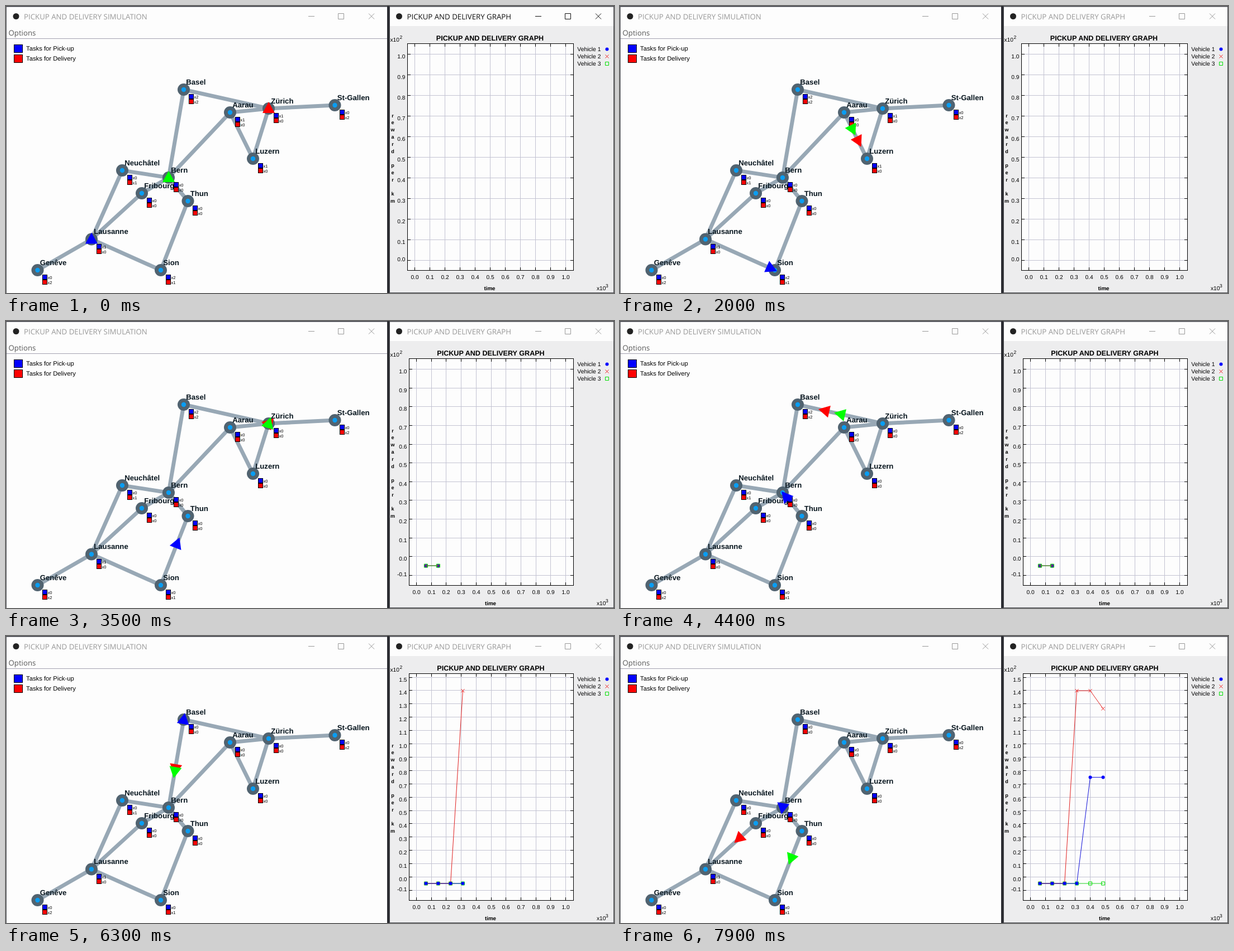
These frames come from a looping animation (1088 px wide and 515 px high, 8 s). An HTML page:

```html
<!DOCTYPE html>
<html lang="en">
<head>
<meta charset="utf-8">
<title>Pickup and delivery simulation</title>
<style>
  html, body { margin: 0; width: 100%; height: 100%; overflow: hidden; background: #fdfdfd; }
  svg { display: block; width: 1088px; height: 515px; text-rendering: geometricPrecision; }
  text { font-family: "Liberation Sans", Arial, sans-serif; white-space: pre; }
  .ui { font-family: "Open Sans", "Noto Sans", sans-serif; font-size: 13.25px; }
  .bold { font-weight: bold; }
  .mid { text-anchor: middle; }
  .end { text-anchor: end; }
  .tick { font-size: 10.2px; }
</style>
</head>
<body>
<svg id="stage" viewBox="0 0 1088 515" xmlns="http://www.w3.org/2000/svg">
  <g id="windows"></g>
  <g id="graph"></g>
  <g id="map"></g>
  <g id="tasks"></g>
  <g id="vehicles"></g>
</svg>
<script>
const LOOP = 8000, STEP = 100;
const BLUE = '#0000ff', RED = '#ff0000', GREEN = '#00ff00';
const COLORS = [BLUE, RED, GREEN];

// name: [x, y, pick-ups, deliveries]
const cities = {
  Basel: [318, 150, 2, 2], Aarau: [401, 191, 1, 0], 'Zürich': [470, 184, 1, 0],
  'St-Gallen': [588.5, 178, 0, 2], Luzern: [442, 274, 1, 0], 'Neuchâtel': [208, 295, 0, 1],
  Bern: [291, 308, 0, 0], Fribourg: [243, 336, 0, 0], Thun: [325.5, 350, 0, 0],
  Lausanne: [153, 418.5, 1, 0], Sion: [277, 474, 2, 1], 'Genêve': [56.5, 474, 0, 2]
};
const roads = ['Genêve Lausanne Neuchâtel Bern Basel Zürich St-Gallen',
  'Lausanne Fribourg Bern Aarau Zürich Luzern Aarau', 'Lausanne Sion Thun Bern'];

// [time, city, 0 pick-up | 1 delivery, new count]
const events = [
  [1600, 'Aarau', 0, 0], [2300, 'Sion', 0, 1], [2400, 'Luzern', 0, 0], [2600, 'Sion', 0, 0],
  [3400, 'Zürich', 0, 0], [4900, 'Basel', 0, 1], [5000, 'Basel', 1, 1],
  [5200, 'Basel', 0, 0], [5400, 'Basel', 1, 0]
];

// keys: [time, position along route], one unit per leg
const vehicles = [
  { route: 'Lausanne Sion Thun Bern Basel Bern',
    keys: [[0, 0], [1599, 0], [1600, .63], [2000, .943], [2070, 1], [2770, 1], [3500, 1.6], [4010, 2],
      [4400, 2.83], [4500, 3], [5100, 3.39], [5990, 4], [6430, 4], [7900, 5]] },
  { route: 'Zürich Aarau Luzern Zürich Basel Bern Fribourg Lausanne',
    keys: [[0, 0], [1599, 0], [1600, 1.15], [2000, 1.615], [2330, 2], [2470, 2], [3340, 3],
      [3490, 3], [4400, 3.68], [4870, 4], [5480, 4], [6300, 4.557], [6960, 5], [7475, 6], [7900, 6.33]] },
  { route: 'Bern Aarau Luzern Zürich Basel Bern Thun Sion',
    keys: [[0, 0], [1599, 0], [1600, .96], [2000, 1.365], [2560, 2], [3450, 3], [3690, 3],
      [4400, 3.495], [5100, 4], [5440, 4], [6300, 4.589], [6910, 5], [7415, 6], [7900, 6.395]] }
];

const pointTimes = [.062, .144, .227, .309, .399, .485];
const rewards = [
  [-.05, -.05, -.05, -.05, .747, .747],
  [-.05, -.05, -.05, 1.397, 1.397, 1.262],
  [-.05, -.05, -.05, -.05, -.05, -.05]
];

const put = (id, html) => { document.getElementById(id).innerHTML = html; };
const text = (x, y, s, cls = '', size = '', fill = '#000') =>
  `<text x="${x}" y="${y}" class="${cls}" fill="${fill}"${size && ` font-size="${size}"`}>${s}</text>`;
const rect = (x, y, w, h, fill, stroke = 'none') =>
  `<rect x="${x}" y="${y}" width="${w}" height="${h}" fill="${fill}" stroke="${stroke}"/>`;
const path = (d, stroke, width = 1, fill = 'none') =>
  `<path d="${d}" stroke="${stroke}" stroke-width="${width}" fill="${fill}"/>`;
const dot = (x, y, r, fill) => `<circle cx="${x}" cy="${y}" r="${r}" fill="${fill}"/>`;

function titleBar(x, right, title, color) {
  const c = right - 28;
  return dot(x + 17, 18.5, 5.5, '#222') + text(x + 31, 23.5, title, 'ui', '', color) +
    path(`M${c - 113} 18.5h11M${c - 59.5} 13.5h10v10h-10zM${c - 5} 13.5l10 10m0 -10l-10 10`, color);
}

function drawWindows(focused) {
  put('windows',
    rect(0, 0, 1088, 515, '#fdfdfd') + rect(686, 36, 402, 479, '#ededee') +
    rect(0, 0, 1088, 1.5, '#33343c') + rect(0, 0, 1, 515, '#55565c') + rect(682, 0, 4, 515, '#2b2c31') +
    rect(686.5, .5, 401, 514, 'none', '#4a4b50') +
    titleBar(1, 682, 'PICKUP AND DELIVERY SIMULATION', '#999') +
    titleBar(686.5, 1088, 'PICKUP AND DELIVERY GRAPH', focused ? '#111' : '#999') +
    text(4.5, 52.5, 'Options', 'ui', '', '#5a5a5a') + rect(1, 58, 681, 1, '#a3a1b0') +
    rect(14.5, 69.5, 15, 14, BLUE, '#000') + text(36, 80, 'Tasks for Pick-up', '', 11.25) +
    rect(14.5, 87.5, 15, 14, RED, '#000') + text(36, 98.3, 'Tasks for Delivery', '', 11.25));
}

function marker(kind, x, y) {
  if (kind === 0) return dot(x, y, 3, BLUE);
  if (kind === 1) return path(`M${x - 3} ${y - 3}l6 6m0 -6l-6 6`, '#f01818');
  return path(`M${x - 3} ${y - 3}h6v6h-6z`, '#00e000');
}

function drawGraph(n) {
  const left = n ? 721 : 718, right = 1015, top = 67, bottom = 474;
  const min = n ? -.1 : 0, max = n > 3 ? 1.448 : 1;
  const spanX = (right - left) / 1.1, spanY = (bottom - top) / 1.1;
  const px = v => left + spanX * (.05 + v);
  const py = v => bottom - spanY * (.05 + (v - min) / (max - min));
  const mid = (left + right) / 2;
  const frame = fill => rect(left + .5, top + .5, right - left, bottom - top, fill, '#000');
  let grid = '', ticks = '', labels = '', out = '';

  for (let i = 0; i <= 10; i++) {
    const x = Math.floor(px(i / 10)) + .5;
    grid += `M${x} ${top}V${bottom}`;
    ticks += `M${x} ${top}v6M${x} ${bottom + 1}v-6`;
    labels += text(x, 489.7, (i / 10).toFixed(1), 'tick mid');
  }
  const first = Math.round(min * 10);
  for (let i = first; py(i / 10) > top; i++) {
    const y = Math.ceil(py(i / 10)) + .5;
    grid += `M${left} ${y}H${right}`;
    ticks += `M${left} ${y}h6M${right + 1} ${y}h-6`;
    labels += text(left - 3.5, y + (i > first ? 7 : 1), (i / 10).toFixed(1), 'tick end');
  }
  out = frame('#fdfdfd') + path(grid, '#c3c3d2') + path(ticks, '#000') + frame('none') + labels;

  const order = n > 3 ? [2, 1, 0] : [0, 1, 2];
  for (const k of order) {
    const pts = rewards[k].slice(0, n).map((v, i) => [px(pointTimes[i]) + .5, py(v) + .5]);
    if (n) out += path('M' + pts.join('L'), ['#1010d8', '#e02020', '#20d020'][k]);
    out += pts.map(p => marker(k, ...p)).join('');
  }

  out += text(mid - .5, 62, 'PICKUP AND DELIVERY GRAPH', 'bold mid', 12.6) +
    text(mid - 1, 509.5, 'time', 'bold mid', 9.8) +
    text(687.5, 64, 'x10', 'tick') + text(704.5, 58.5, '2', '', 8.5) +
    text(1057, 510, 'x10', 'tick') + text(1073, 504.5, '3', '', 8.5);
  [...'reward per km'].forEach((c, i) => { out += text(692, 199.5 + i * 12.8, c, 'bold mid', 9); });
  for (let k = 0; k < 3; k++) {
    out += text(1064.5, 80.5 + k * 13, 'Vehicle ' + (k + 1), 'end', 10.4) + marker(k, 1075.5, 77.5 + k * 13);
  }
  put('graph', out);
}

function drawMap() {
  const list = Object.entries(cities);
  put('map',
    roads.map(r => path('M' + r.split(' ').map(c => cities[c].slice(0, 2)).join('L'), '#98a8b5', 7)).join('') +
    list.map(([, [x, y]]) => dot(x, y, 11, '#516370') + dot(x, y, 4.2, '#0a9df2')).join('') +
    list.map(([name, [x, y]]) => text(x + 4.2, y - 9.3, name, 'bold', 13.2, '#08161f')).join(''));
}

function drawTasks(t) {
  let out = '';
  for (const [name, [x, y, ...counts]] of Object.entries(cities)) {
    for (const [when, city, kind, value] of events) {
      if (city === name && t >= when) counts[kind] = value;
    }
    counts.forEach((n, k) => {
      const left = Math.floor(x) + 9.5, top = Math.round(y) + 8.5 + k * 9;
      out += rect(left, top, 8, 8, COLORS[k], '#000') + text(left + 9, top + 7, 'x' + n, '', 7.5);
    });
  }
  put('tasks', out);
}

function along(keys, t) {
  const i = keys.findIndex(k => k[0] > t);
  if (i < 0) return keys[keys.length - 1][1];
  const [t0, a] = keys[i - 1], [t1, b] = keys[i];
  return a + (b - a) * (t - t0) / (t1 - t0);
}

function drawVehicles(t) {
  put('vehicles', vehicles.map(({ route, keys }, k) => {
    const stops = route.split(' '), p = along(keys, t);
    const leg = Math.max(0, Math.ceil(p) - 1), f = p - leg;
    const [x0, y0] = cities[stops[leg]], [x1, y1] = cities[stops[leg + 1]];
    const dx = x1 - x0, dy = y1 - y0;
    const turn = p ? Math.atan2(dy, dx) * 180 / Math.PI + 90 : 0;
    return `<path d="M0-12L11 8H-11z" fill="${COLORS[k]}" ` +
      `transform="translate(${x0 + dx * f} ${y0 + dy * f}) rotate(${turn})"/>`;
  }).join(''));
}

let shown = -1, focus, points;
function render(t) {
  const now = Math.floor(t / STEP) * STEP;
  if (now === shown) return;
  shown = now;
  const active = now < 1300;
  if (active !== focus) drawWindows(focus = active);
  const n = Math.min(6, Math.max(0, Math.floor((now - 1500) / 1000)));
  if (n !== points) drawGraph(points = n);
  drawTasks(now);
  drawVehicles(now);
}

drawMap();
const start = performance.now();
function tick() {
  render((performance.now() - start) % LOOP);
  requestAnimationFrame(tick);
}
tick();
</script>
</body>
</html>
```
